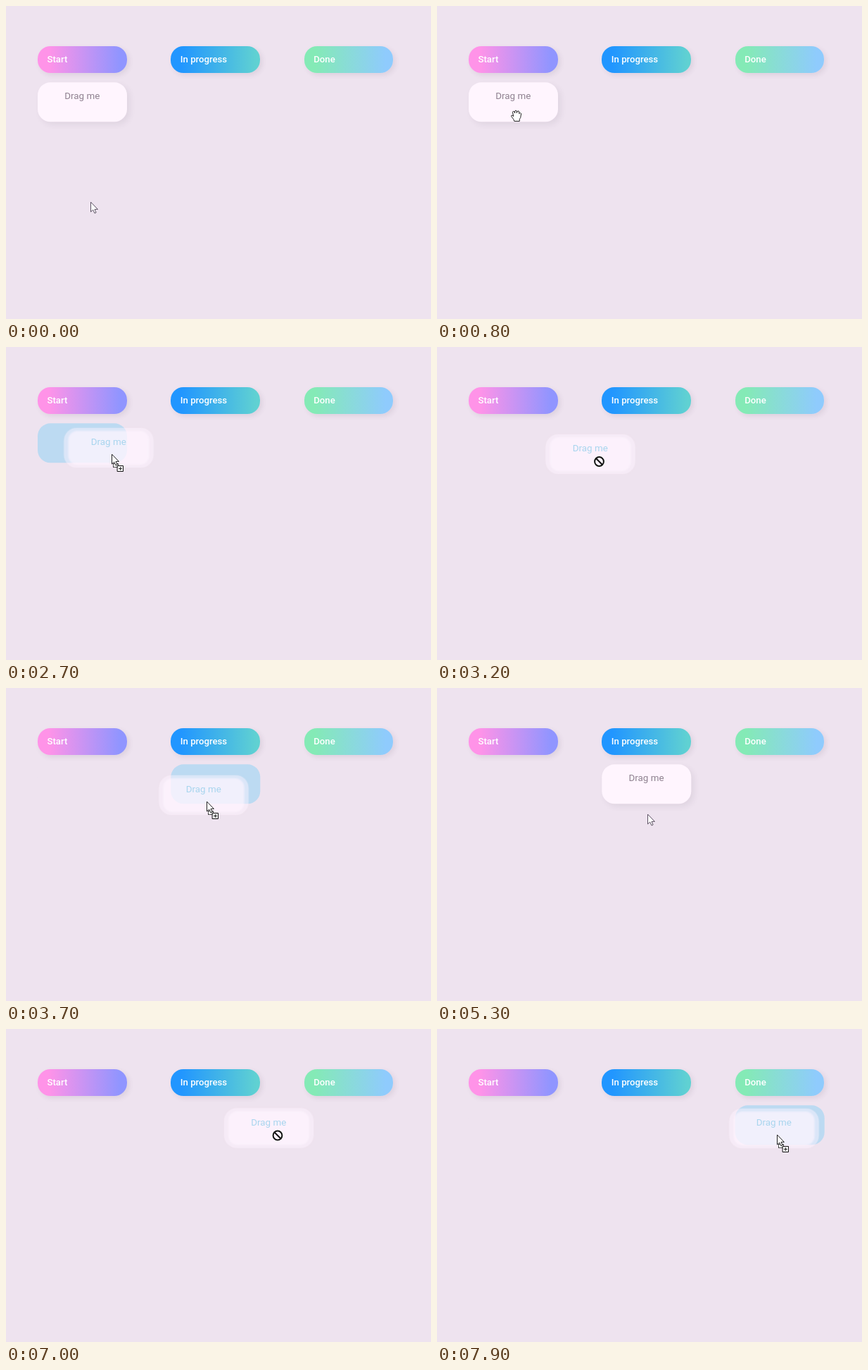
Recreate the animation shown at these times as an HTML page. Size 604 by 444 pixels, loop 8000 ms.

```html
<!DOCTYPE html>
<html lang="en">
<head>
<meta charset="utf-8">
<title>Drag and drop board</title>
<style>
html, body { margin: 0; width: 100%; height: 100%; overflow: hidden; background: #eee3ef; }
#stage { position: relative; width: 604px; height: 444px; overflow: hidden; font: 13.4px/20px Roboto, sans-serif; }
.head, .card { position: absolute; left: 0; top: 0; box-sizing: border-box; width: 126.5px; border-radius: 18px; }
.head {
  top: 57px; height: 38px; padding-left: 13.5px; line-height: 38px; color: #fff;
  font-weight: 500; font-size: 13.2px; box-shadow: 3px 3px 7px rgba(70, 50, 80, .1);
}
.card { height: 55.5px; padding-top: 9.5px; text-align: center; color: #8f8190; }
#card { background: #fff5fe; box-shadow: 4px 4px 8px rgba(70, 50, 80, .08); }
#slot { background: #bcdaf2; }
#ghost { background: rgba(255, 244, 254, .45); color: #a8d5ee; box-shadow: 0 0 2px rgba(255, 244, 254, .5); }
#ghost::before {
  content: ""; position: absolute; z-index: -1; inset: 4px 6px; border-radius: 13px;
  background: rgba(255, 246, 255, .62); filter: blur(1px);
}
#ghost { isolation: isolate; }
#cursor { position: absolute; left: 0; top: 0; width: 1px; height: 1px; overflow: visible; }
#cursor path, #cursor rect { stroke-linejoin: round; stroke-linecap: round; }
</style>
</head>
<body>
<div id="stage">
  <div class="card" id="slot"></div>
  <div class="card" id="card">Drag me</div>
  <div class="card" id="ghost">Drag me</div>
  <svg id="cursor">
    <defs>
      <path id="tip" d="M.5 .5V14L3.7 11.1 6 16 8.1 15 6 10.4H10Z" fill="#fff"/>
    </defs>
    <g data-look="arrow"><use href="#tip" stroke="#5c5263"/></g>
    <g data-look="open" fill="#fff" stroke="#222">
      <path d="M-3 11L-4 8.5-7 4.6Q-7.4 2.6-5.4 3.2L-4 4.6-5.2-1.6Q-4.8-3.3-3.2-2.3L-2-.2V-3Q-.7-5 .6-3V-.4L1.8-2.8Q3.6-3.8 4 -2V.6Q6 -1.4 7 .6L6 6.5 4.6 8.5V11Z"/>
    </g>
    <g data-look="fist" fill="#fff" stroke="#222">
      <path d="M-2.3 10.2V8.6L-4.8 5.4Q-5.4 3.4-3.6 3.2V1.4Q-3.2-.2-1.8.3-.6-1 .6-.1 2.2-1 3 .5 4.8.2 5 2 6.6 1.8 6.6 3.8 6.4 6.6 5 8.4V10.2Z"/>
      <path d="M-1.7.6V2M.8.2V2M3 .7V2.2M-3.5 3.3V5" fill="none"/>
    </g>
    <g data-look="copy">
      <rect x="2.5" y="13.5" width="7" height="5" fill="#fff" stroke="#333" stroke-dasharray="1.5 1"/>
      <use href="#tip" stroke="#222"/>
      <rect x="8.5" y="16.5" width="8" height="8" fill="#fff" stroke="#111"/>
      <path d="M10.5 20.5H14.5M12.5 18.5V22.5" stroke="#222"/>
    </g>
    <g data-look="deny" fill="none">
      <circle cx="8.5" cy="1.5" r="6.4" stroke="#fff" stroke-width="3"/>
      <circle cx="8.5" cy="1.5" r="6.4" stroke="#111" stroke-width="2"/>
      <path d="M4-3L13 6" stroke="#111" stroke-width="2"/>
    </g>
  </svg>
</div>
<script>
const LOOP = 8000, STEP = 100, WIDTH = 126.5, TOP = 108.3, GRAB = [67.5, 37];
const columns = [
  { x: 45, name: "Start", fill: "#ff93e8 12%, #9095ff 92%" },
  { x: 234.3, name: "In progress", fill: "#2196ff 12%, #60d1d2 96%" },
  { x: 423.7, name: "Done", fill: "#84eab6 12%, #8fcbfd 92%" }
];

// time, x, y of the pointer tip
const path = [
  [0, 120, 278], [300, 119, 242], [600, 114, 168], [900, 112, 144], [1800, 112, 144],
  [2100, 120, 147], [2700, 150, 152], [3000, 182, 158], [3400, 262, 164],
  [3700, 285, 161], [4000, 289, 160], [4500, 289, 160], [4800, 296, 206],
  [5100, 300, 238], [5200, 300, 238], [5300, 299, 179], [5700, 301, 156],
  [6100, 302, 144], [6700, 302, 144], [6800, 309, 146], [7000, 377.5, 149.5],
  [7200, 428, 150], [7600, 476, 150], [7900, 483, 150]
];
const drags = [
  { press: 1300, from: 1900, to: 4000 },
  { press: 6300, from: 6800, to: LOOP }
];

const $ = id => document.getElementById(id);
const stage = $("stage"), card = $("card"), slot = $("slot"), ghost = $("ghost"), cursor = $("cursor");

for (const { x, name, fill } of columns) {
  const head = document.createElement("div");
  head.className = "head";
  head.textContent = name;
  head.style.left = x + "px";
  head.style.background = `linear-gradient(90deg, ${fill})`;
  stage.prepend(head);
}

function pointer(t) {
  const i = path.findIndex(p => p[0] > t);
  if (i < 0) return path.at(-1).slice(1);
  const [a, ax, ay] = path[i - 1], [b, bx, by] = path[i];
  const k = (t - a) / (b - a);
  return [ax + (bx - ax) * k, ay + (by - ay) * k];
}

function place(el, x, y) {
  el.style.transform = `translate(${x}px, ${y}px)`;
}

function show(el, on) {
  el.style.display = on ? "" : "none";
}

function draw(t) {
  const [x, y] = pointer(t);
  const dragging = drags.some(d => t >= d.from && t < d.to);
  const pressed = drags.some(d => t >= d.press && t < d.from);
  const over = columns.find(c => x >= c.x && x <= c.x + WIDTH);
  const home = columns[t < drags[0].to ? 0 : 1];

  show(card, !dragging);
  show(ghost, dragging);
  show(slot, dragging && over);
  place(card, home.x, TOP);
  place(ghost, x - GRAB[0], y - GRAB[1]);
  if (over) place(slot, over.x, TOP);

  const onCard = over === home && y > TOP && y < TOP + 55;
  const look = dragging ? (over ? "copy" : "deny")
    : pressed ? "fist" : onCard ? "open" : "arrow";
  for (const g of cursor.querySelectorAll("[data-look]")) show(g, g.dataset.look === look);
  place(cursor, x, y);
}

const start = performance.now();
function tick(now) {
  const t = Math.max(0, now - start) % LOOP;
  draw(Math.floor(t / STEP) * STEP);
  requestAnimationFrame(tick);
}
draw(0);
requestAnimationFrame(tick);
</script>
</body>
</html>
```
